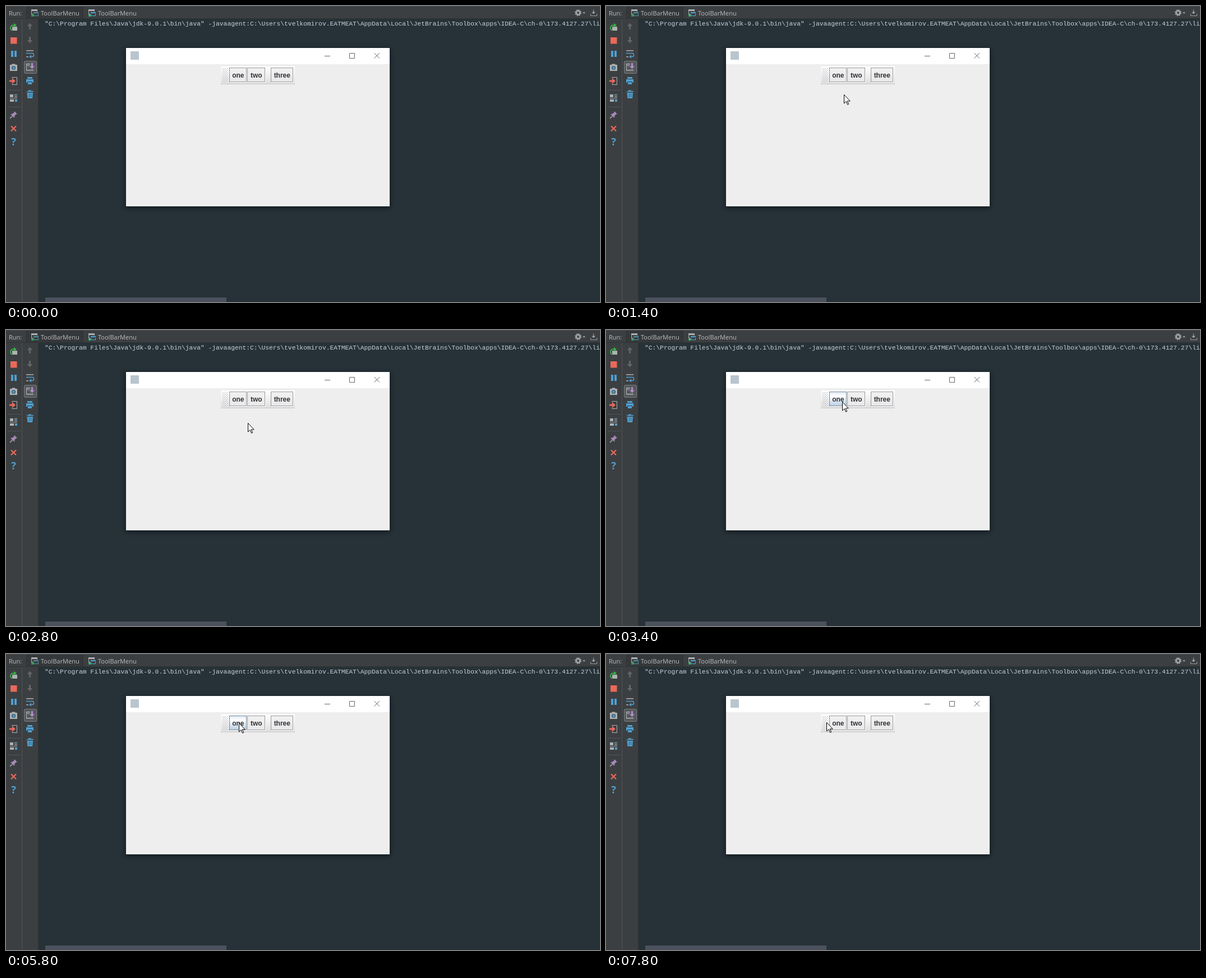
Write an HTML page that moves like this. It is 1059 by 529 pixels and loops after 8 s.

```html
<!DOCTYPE html>
<html lang="en">
<head>
<meta charset="utf-8">
<title>ToolBarMenu</title>
<style>
  html, body { margin: 0; width: 100%; height: 100%; overflow: hidden; background: #263238; }
  svg { display: block; width: 1059px; height: 529px; }
  text { white-space: pre; }
  .ui { font: 11px "Open Sans", "Noto Sans", sans-serif; fill: #bbbbbb; }
  .console { font: 11.3px "Liberation Mono", monospace; fill: #c5d0d5; }
  .label { font: bold 12px "Liberation Sans", sans-serif; fill: #333333; }
  .line { fill: none; stroke-width: 1; }
  .crisp { shape-rendering: crispEdges; }
  .grey { fill: #afb1b3; }
  .blue { fill: #4f9fcf; }
  .red { fill: #e9695a; }
  .off { fill: #626567; }
</style>
</head>
<body>
<svg viewBox="0 0 1059 529" xmlns="http://www.w3.org/2000/svg">
  <defs>
    <linearGradient id="bar" x2="0" y2="1">
      <stop stop-color="#ffffff"/><stop offset="1" stop-color="#dedede"/>
    </linearGradient>
    <linearGradient id="plain" x2="0" y2="1">
      <stop stop-color="#f1f1f1"/><stop offset="1" stop-color="#e9e9ec"/>
    </linearGradient>
    <linearGradient id="hot" x2="0" y2="1">
      <stop stop-color="#dde8f3"/><stop offset=".3" stop-color="#ffffff"/>
      <stop offset=".4" stop-color="#f6f9fc"/><stop offset="1" stop-color="#b8cfe5"/>
    </linearGradient>
    <pattern id="grip" width="4" height="4" x="385" y="110" patternUnits="userSpaceOnUse">
      <path fill="#fff" d="M0 0h1v1h-1zM2 2h1v1h-1z"/>
      <path fill="#8795a3" d="M1 1h1v1h-1zM3 3h1v1h-1z"/>
    </pattern>
    <filter id="soft" x="-10%" y="-10%" width="120%" height="120%"><feGaussianBlur stdDeviation="4"/></filter>
    <g id="runIcon">
      <path class="grey" d="M0 0h11v9h-11z"/>
      <path fill="#3c3f41" d="M1 3h9v5h-9z"/>
      <path fill="#3c3f41" d="M3 4h11v9h-11z"/>
      <path fill="currentColor" d="M4 5h9v2h-9zM4 8h1v3h-1zM12 8h1v3h-1zM4 11h9v1h-9z"/>
    </g>
  </defs>

  <!-- tool window frame -->
  <rect width="1059" height="529" fill="#263238"/>
  <g class="crisp">
    <rect width="1059" height="23" fill="#3c3f41"/>
    <rect width="58" height="529" fill="#3c3f41"/>
    <path fill="#35383a" d="M37 1h100v21h-100z"/>
    <path fill="#2f3234" d="M0 22h1059v1h-1059zM36 1h1v21h-1zM137 1h1v21h-1z"/>
    <path fill="#4b4e50" d="M0 0h1059v1h-1059z"/>
    <path fill="#505355" d="M28 23h1v506h-1z"/>
    <path fill="#313436" d="M57 23h1v506h-1z"/>
    <rect x="70" y="521" width="323" height="8" fill="#4c525d"/>
  </g>
  <text class="ui" x="5" y="17">Run:</text>
  <text class="ui" x="62" y="17">ToolBarMenu</text>
  <text class="ui" x="164" y="17">ToolBarMenu</text>
  <use href="#runIcon" x="45" y="6" color="#4a8fa3"/>
  <use href="#runIcon" x="147" y="6" color="#49a6d8"/>
  <circle cx="47" cy="17" r="2" fill="#3ba55c"/>
  <circle cx="149" cy="17" r="2" fill="#3bc95c"/>

  <!-- header actions -->
  <g class="line" stroke="#9c9fa1">
    <circle cx="1020" cy="12" r="3.4" stroke-width="3"/>
    <circle cx="1020" cy="12" r="5" stroke-width="2" stroke-dasharray="2 1.93"/>
    <path d="M1047.5 6v7M1042.5 14v3.500h11v-3.500"/>
  </g>
  <path fill="#9c9fa1" d="M1028 11h5l-2.500 3zM1044 10.500h7l-3.500 4z"/>

  <!-- left actions -->
  <path class="grey" d="M11 37h9v7h-9z"/>
  <path class="line" stroke="#3cab4c" stroke-width="2" d="M12 43.500a4.500 4.500 0 1 1 1-9h2" style="stroke-width:2"/>
  <path fill="#3cab4c" d="M14 30.500l5 4-5 4z"/>
  <rect class="red" x="8" y="56" width="11.500" height="11.500"/>
  <path class="blue" d="M9 80h4v11h-4zM15 80h4v11h-4z"/>
  <path class="grey" d="M7 105h3l1-1.500h5l1 1.500h3v11h-13z"/>
  <circle cx="13.500" cy="110.500" r="3.600" fill="#3c5a6c"/>
  <circle cx="13.500" cy="110.500" r="2.200" class="blue"/>
  <path class="line" stroke="#afb1b3" d="M11 129.500v-2h8.500v13h-8.500v-2"/>
  <path class="red" d="M6 132.500h5v-3.500l6 5-6 5v-3.500h-5z"/>
  <path class="line" stroke="#777a7c" stroke-dasharray="1 2" d="M4 150.500h22M4 180.500h22"/>
  <path class="grey" d="M7 158h6v5h-6zM7 164.500h13v1h-13zM7 167h7v4h-7zM15 158h5v1h-5zM15 162h5v1h-5z"/>
  <path class="blue" d="M15 160h5v1h-5zM16 167h4v4h-4z"/>
  <path class="line" stroke="#afb1b3" style="stroke-width:1.500" d="M7 201l5-5"/>
  <path fill="#a889b8" d="M15 188l5 5-2 .5-2.500 2.500-.5 4-7-7 4-.5 2.500-2.500z"/>
  <path class="line" stroke="#e9695a" style="stroke-width:2.200" d="M9 214.500l9 9M18 214.500l-9 9"/>
  <text x="13.500" y="249" text-anchor="middle" font-family="Open Sans, sans-serif" font-size="18" font-weight="bold" class="blue">?</text>

  <path class="off" d="M42.500 30.500l5 5.500h-3.500v6h-3v-6h-3.500zM42.500 66.500l5-5.500h-3.500v-6h-3v6h-3.500z"/>
  <path class="grey" d="M36 79h13v1.500h-13zM36 90h4v1.500h-4z"/>
  <path class="line" stroke="#4f9fcf" style="stroke-width:1.500" d="M36 84.500h11.500q2 0 2 3t-2 3h-4"/>
  <path class="blue" d="M45 87.500v6l-4-3z"/>
  <rect x="32.500" y="98.500" width="22" height="22" rx="2" fill="#55585a" stroke="#7b7e80"/>
  <path class="grey" d="M36 103h7v1.500h-7zM36 106h6v1h-6zM36 103h1v12h-1zM36 114h13v1.500h-13z"/>
  <path fill="#b58acb" d="M45 102h3v5.500h3l-4.500 5-4.500-5h3z"/>
  <path class="blue" d="M38 127h9v3h-9zM36 131h13v6h-2v-2h-9v2h-2zM39 136h7v4h-7z"/>
  <path class="blue" d="M37 152h3v-1.500h5v1.500h4v1.500h-12zM37.500 155h10.500l-1 10h-8.500z"/>
  <path class="line" stroke="#3c5f74" d="M41.500 156.500v6.500M44.500 156.500v6.500"/>

  <text class="console" x="69" y="35">"C:\Program Files\Java\jdk-9.0.1\bin\java" -javaagent:C:\Users\tvelkomirov.EATMEAT\AppData\Local\JetBrains\Toolbox\apps\IDEA-C\ch-0\173.4127.27\lib</text>

  <!-- application window -->
  <rect x="213" y="77" width="472" height="284" fill="#000" opacity=".5" filter="url(#soft)"/>
  <g class="crisp">
    <rect x="213" y="74" width="472" height="285" fill="#20292e"/>
    <rect x="214" y="75" width="470" height="283" fill="#eeeeee"/>
    <rect x="214" y="75" width="470" height="29" fill="#ffffff"/>
    <rect x="222" y="81" width="15" height="15" fill="#b9c5ce"/>
  </g>
  <path class="line" stroke="#666" d="M568 89.500h10M612.500 84.500h9v9h-9zM656.500 84l9.500 9.500M666 84l-9.500 9.500"/>
  <g class="crisp">
    <rect x="383" y="108" width="132" height="31" fill="url(#bar)"/>
    <rect x="383" y="139" width="132" height="1" fill="#c9c9c9"/>
    <rect x="385" y="110" width="11" height="27" fill="url(#grip)"/>
  </g>
  <g id="buttons"></g>

  <!-- pointers -->
  <path id="arrow" fill="#fff" stroke="#000" d="M.5.500v15.500l3.600-3.400 2.600 5.700 2-.9-2.500-5.500h5z"/>
  <path id="resize" fill="#fff" stroke="#000" d="M-14.500 0l4-4v3h17v-3l5 4-5 4v-3h-17v3z"/>
</svg>
<script>
  const LOOP = 8000;
  // time, pointer, x, y, highlighted button
  const STEPS = [
    [0, ""],
    [800, "resize", -4, 308.5],
    [1000, "arrow", 416, 238],
    [1200, "arrow", 430, 184],
    [1400, "arrow", 424, 158],
    [1600, "arrow", 415, 128, "one"],
    [1800, "arrow", 413, 126, "one"],
    [2800, "arrow", 431, 166],
    [3000, "arrow", 427, 132],
    [3200, "arrow", 423, 128, "one"],
    [3400, "arrow", 421, 128, "one"],
    [4800, "arrow", 442, 123, "two"],
    [5000, "arrow", 449, 123, "two"],
    [5600, "arrow", 418, 123, "one"],
    [5800, "arrow", 415, 123, "one"],
    [7600, "arrow", 406, 123, "one"],
    [7800, "arrow", 393, 122]
  ];
  const BUTTONS = [["one", 398, 31], ["two", 430, 32], ["three", 472, 40]];
  const pointers = ["arrow", "resize"].map(id => document.getElementById(id));
  const faces = {};

  function add(parent, tag, attrs) {
    const el = document.createElementNS("http://www.w3.org/2000/svg", tag);
    for (const key in attrs) el.setAttribute(key, attrs[key]);
    return parent.appendChild(el);
  }

  const group = document.getElementById("buttons");
  for (const [name, x, w] of BUTTONS) {
    add(group, "rect", { x: x + 1, y: 111, width: w, height: 26, fill: "#fff", class: "crisp" });
    faces[name] = add(group, "rect", { x: x + .5, y: 110.5, width: w - 1, height: 25 });
    add(group, "text", { x: x + w / 2 + .3, y: 128, "text-anchor": "middle", class: "label" }).textContent = name;
  }

  function draw(now) {
    const t = now % LOOP;
    const [, kind, x, y, hot] = STEPS.findLast(step => step[0] <= t);
    for (const el of pointers) {
      const on = el.id === kind;
      el.setAttribute("visibility", on ? "visible" : "hidden");
      if (on) el.setAttribute("transform", `translate(${x} ${y})`);
    }
    for (const name in faces) {
      const on = name === hot;
      faces[name].setAttribute("fill", on ? "url(#hot)" : "url(#plain)");
      faces[name].setAttribute("stroke", on ? "#7a8a99" : "#999999");
    }
  }

  const start = performance.now();
  function tick() {
    draw(performance.now() - start);
    requestAnimationFrame(tick);
  }
  tick();
</script>
</body>
</html>
```
